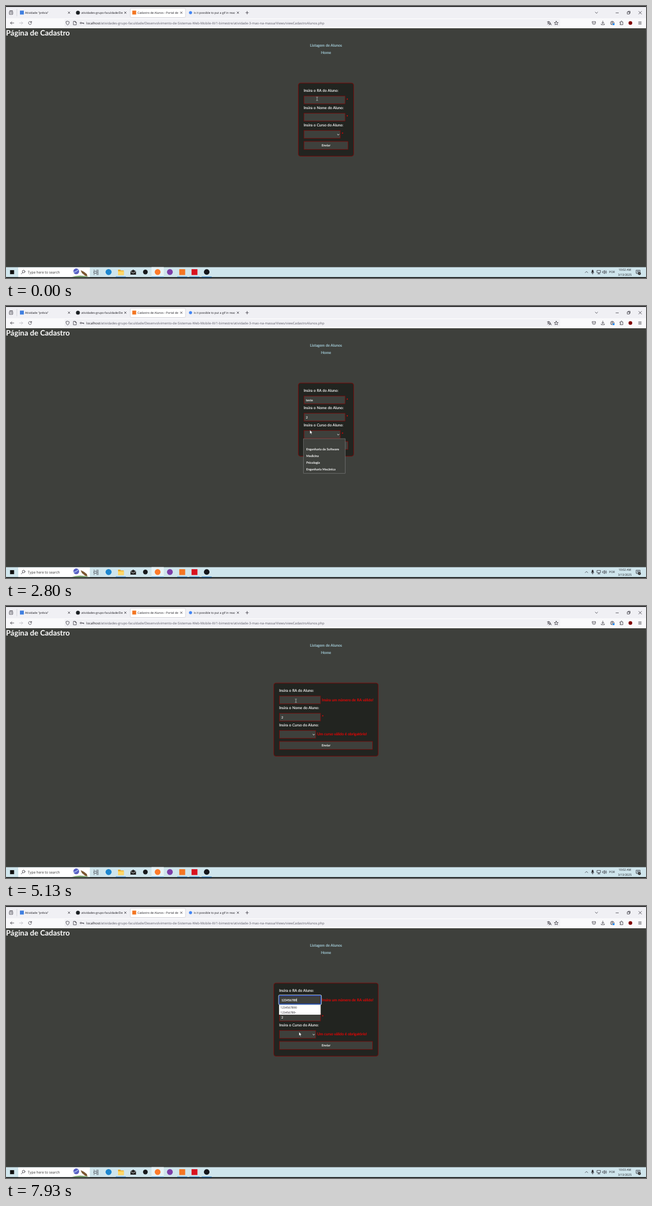
An HTML page that plays this animation: 1148x488 px, repeating every 8000 ms.

```html
<!DOCTYPE html>
<html lang="pt">
<head>
<meta charset="utf-8">
<title>Página de Cadastro</title>
<style>
  html, body { margin: 0; width: 100%; height: 100%; overflow: hidden; background: #000; }
  svg { display: block; width: 1148px; height: 488px; }
  text { text-rendering: geometricPrecision; white-space: pre; }
  .ui { font-family: "Open Sans", "Noto Sans", sans-serif; font-size: 5.16px; fill: #15141a; }
  .page { font-family: Lato, "Open Sans", sans-serif; font-size: 6.75px; fill: #fff;
          stroke: #fff; stroke-width: .12px; word-spacing: .1px; }
  .page .small { font-size: 5.65px; }
  .red { fill: #f00; stroke: #f00; }
  .link { fill: #add8e6; stroke: #add8e6; text-anchor: middle; }
  .line { fill: none; stroke: #2b2a33; stroke-width: .75; stroke-linecap: round; stroke-linejoin: round; }
  .field { fill: #3e403c; stroke: #8b0000; stroke-width: .7; }
  .mid { text-anchor: middle; }
</style>
</head>
<body>
<svg viewBox="0 0 1148 488">
  <rect width="1148" height="488"/>

  <!-- tab strip -->
  <rect y="1.5" width="1148" height="21" fill="#f0f0f4"/>
  <rect x="223" y="4" width="99" height="16.5" rx="2" fill="#fff" stroke="#c4c4cc" stroke-width=".6"/>
  <rect x="25" y="8.3" width="7" height="7" fill="#3f7fe0"/>
  <circle cx="129" cy="12" r="3.5" fill="#1b1f23"/>
  <rect x="226.5" y="8.3" width="7" height="7" fill="#f37623"/>
  <circle cx="331" cy="12" r="2.8" fill="#4285f4"/>
  <g class="ui">
    <text x="34" y="13.9">Atividade "prévia"</text>
    <text x="135" y="13.9">atividades-grupo-faculdade/De</text>
    <text x="236" y="13.9">Cadastro de Alunos - Portal de</text>
    <text x="337" y="13.9">is it possible to put a gif in reac</text>
  </g>
  <g class="line">
    <path d="M6.5 10h5.5v5h-5.5zM6.8 8.4h5M8 12.5h2.5"/>
    <path d="M19.5 6v12" stroke="#b8b8c2" stroke-width=".5"/>
    <path id="closers"/>
    <path d="M430 12h5M432.5 9.5v5"/>
    <path d="M1057 11l2.2 2.2 2.2-2.2M1094 12.3h4.6M1114.7 10.8h3.6v3.6h-3.6zM1115.9 10.6v-1.2h3.6v3.6h-1M1135 9.5l5 5m0-5l-5 5"/>
  </g>

  <!-- address bar -->
  <rect y="22" width="1148" height="18" fill="#f9f9fb"/>
  <path d="M0 39.7h1148" stroke="#c9c9d0" stroke-width=".5"/>
  <rect x="105" y="23.8" width="889" height="13.8" rx="2" fill="#f0f0f4"/>
  <text class="ui" x="144" y="32.9" style="font-size:5.94px;fill:#5b5b66"><tspan fill="#15141a">localhost</tspan>/atividades-grupo-faculdade/Desenvolvimento-de-Sistemas-Web-Mobile-III/1-bimestre/atividade-3-mao-na-massa/Views/viewCadastroAlunos.php</text>
  <g class="line">
    <path d="M14 30.5h-6m2.5-2.5l-2.5 2.5 2.5 2.5"/>
    <path d="M24 30.5h6m-2.5-2.5l2.5 2.5-2.5 2.5" stroke="#b5b5bd"/>
    <path d="M45.6 29.2a2.8 2.8 0 1 0 .2 2M45.8 27.4v2h-2"/>
    <path d="M110.5 27.3l2.8 1c0 3-.8 4.6-2.8 5.7-2-1.1-2.8-2.7-2.8-5.7z"/>
    <path d="M121.3 27.5h3l1.8 1.8v4.5h-4.8zM124.2 27.6v1.8h1.8"/>
    <path d="M133 30.5a1.3 1.3 0 1 0 2.6 0 1.3 1.3 0 1 0-2.6 0M135.6 30.5h4v1.4m-1.6-1.4v1.2"/>
    <path d="M971 28.4h4.2m-2.1-1v1m1.4 0c-.4 2-1.8 3.4-3.3 4m.6-3c.6 1.4 1.6 2.2 2.6 2.6M974.2 34l1.9-4.4 1.9 4.4m-3.2-1.3h2.5"/>
    <path d="M987 27.2l1 2.3 2.5.2-1.9 1.6.6 2.5-2.2-1.3-2.2 1.3.6-2.5-1.9-1.6 2.5-.2z"/>
    <path d="M1051.7 28h5.8v2.2a2.9 2.9 0 0 1-5.8 0zM1053.3 29.8l1.3 1.3 1.3-1.3"/>
    <path d="M1070.6 27v4.4m-1.8-1.8l1.8 1.8 1.8-1.8M1067.8 32v1.6h5.6V32"/>
    <circle cx="1087.5" cy="30.5" r="3.2"/><path d="M1086.5 29.5a1 1 0 1 0 2 0 1 1 0 1 0-2 0M1085.4 32.4q2.1-2 4.2 0"/>
    <path d="M1101.5 28.7h1.6q-.5-1.8.9-1.8t.9 1.8h1.6v4.9h-5v-1.5q1.6.4 1.6-.9t-1.6-.9z"/>
    <path d="M1134.7 28.4h4.8m-4.8 2.1h4.8m-4.8 2.1h4.8"/>
  </g>
  <circle cx="1090" cy="32.8" r="1.7" fill="#0a84ff"/>
  <circle cx="1120" cy="30.5" r="3.3" fill="#800000"/>

  <!-- page -->
  <rect y="40" width="1148" height="428.5" fill="#3e403c"/>
  <g class="page">
    <text x="0" y="53.1" style="font-size:13.4px;font-weight:700;stroke:none">Página de Cadastro</text>
    <text class="link" x="574" y="73.2">Listagem de Alunos</text>
    <text class="link" x="574" y="86.2">Home</text>
    <rect id="box" y="138.2" height="131.2" rx="4" fill="#222420" stroke="#8b0000" stroke-width=".8"/>
    <rect id="button" class="field" y="243" height="14.2"/>
    <text class="small mid" x="574" y="252.2">Enviar</text>
    <g id="fields">
      <text x="534" y="154.4">Insira o RA do Aluno:</text>
      <text x="534" y="185.4">Insira o Nome do Aluno:</text>
      <text x="534" y="216.4">Insira o Curso do Aluno:</text>
      <text id="raNote" class="red" x="610.8" y="170.8"></text>
      <text class="red" x="610.8" y="201.4">*</text>
      <text id="courseNote" class="red" x="602.3" y="232.4"></text>
      <rect class="field" x="534.4" y="161.4" width="73.8" height="14"/>
      <rect class="field" x="534.4" y="192.3" width="73.8" height="14"/>
      <rect class="field" x="534.4" y="223.2" width="65.4" height="14"/>
      <path d="M594.2 229.8l1.8 1.8 1.8-1.8" fill="none" stroke-width=".9"/>
      <g id="ring" fill="none">
        <rect x="533.1" y="159.9" width="76.6" height="17" rx="1.2" stroke="#fff" stroke-width="1"/>
        <rect x="534.1" y="160.9" width="74.6" height="15" rx=".6" stroke="#0050d8" stroke-width="1.1"/>
      </g>
      <text id="ra" class="small" x="538" y="170.7"></text>
      <text id="name" class="small" x="538" y="201.6"></text>
      <path id="caret" stroke-width=".6"/>
      <g id="popup" stroke="none">
        <rect id="popupBox" x="533.8" y="177.3" width="74.6" fill="#fff"/>
        <g id="popupRows" class="ui"></g>
      </g>
    </g>
    <g id="courses" class="small">
      <rect x="533.7" y="238" width="74.8" height="62.2" fill="#3e403c" stroke="#858585" stroke-width=".6"/>
      <text x="538.5" y="259.4">Engenharia de Software</text>
      <text x="538.5" y="271.1">Medicina</text>
      <text x="538.5" y="282.8">Psicologia</text>
      <text x="538.5" y="294.5">Engenharia Mecânica</text>
    </g>
  </g>

  <!-- taskbar -->
  <rect y="468.5" width="1148" height="18" fill="#cfe5ec"/>
  <rect x="7.3" y="473.9" width="7.2" height="7.2" fill="#111"/>
  <rect x="22" y="469" width="128.3" height="17.2" fill="#fff"/>
  <text class="ui" x="39" y="479.8" style="font-size:6.3px;fill:#333">Type here to search</text>
  <path d="M117 486.2q16-5 33 0z" fill="#6f9d62"/>
  <circle cx="126" cy="476" r="5.2" fill="#5b62c4"/>
  <path d="M121 478q5-1 9-5" stroke="#a9c4f2" stroke-width="1.5" fill="none"/>
  <path d="M134 474l6 3 5 4 1 4-4-1-6-5z" fill="#7a5630"/>
  <rect x="261" y="468.5" width="22" height="18" fill="#e6f2f6"/>
  <circle cx="184" cy="477.3" r="5.4" fill="#1c86cf"/>
  <path d="M201 473h4l1 1.4h5.3v8H201z" fill="#e9ad2f"/>
  <path d="M201 476h10.3v6.4H201z" fill="#ffd766"/>
  <path d="M223.2 476l5-3 5 3v6h-10z" fill="#222"/>
  <path d="M223.6 476.3l4.6 2.8 4.6-2.8" fill="none" stroke="#fff" stroke-width=".8"/>
  <circle cx="250" cy="477.3" r="4.2" fill="#17181a"/>
  <circle cx="272" cy="477.3" r="5.2" fill="#ff7b2b"/>
  <circle cx="294" cy="477.3" r="5.2" fill="#7d3fa8"/>
  <rect x="310.8" y="472.2" width="10.6" height="10.4" fill="#f37623"/>
  <rect x="332.8" y="472.2" width="10.6" height="10.4" fill="#d9121f"/>
  <circle cx="360" cy="477.3" r="5" fill="#15151a"/>
  <path d="M197 486h18M261 486h22M307 486h18M329 486h18M351 486h18" stroke="#1f78c8" stroke-width="1"/>
  <g class="line">
    <circle cx="31.6" cy="476.4" r="2.4"/><path d="M29.8 478.3l-2.4 2.5"/>
    <path d="M158 474.5v-1m5 1v-1M158 476h5v3.4h-5zM158 481v1.2m5-1.2v1.2M165 473.5v8.8"/>
    <path d="M1039 478.5l2.3-2.3 2.3 2.3"/>
    <rect x="1051" y="473.9" width="2.4" height="4.4" rx="1.2" fill="#222"/><path d="M1050 477.5q0 2.2 2.2 2.2t2.2-2.2M1052.2 479.8v1.4"/>
    <path d="M1060.4 474.4h6v4h-6zM1061.5 480.6h4M1063.4 478.5v2"/>
    <path d="M1070.5 476.2h1.3l1.8-1.7v5.8l-1.8-1.7h-1.3zM1075 475.9q1 1.5 0 3M1076.4 474.9q1.8 2.5 0 5"/>
    <path d="M1130.6 474h6.8v5.4h-3.6l-1.6 1.6v-1.6h-1.6zM1132.2 475.8h3.6m-3.6 1.6h3.6"/>
  </g>
  <circle cx="1136.2" cy="480" r="2.5" fill="#222"/>
  <text class="ui mid" x="1136.2" y="481.3" style="font-size:3.6px;fill:#fff">4</text>
  <g class="ui mid">
    <text x="1087" y="479.2">POR</text>
    <text id="clock" x="1110" y="475.3"></text>
    <text x="1110" y="483.6">3/13/2025</text>
  </g>

  <!-- pointers -->
  <path id="arrow" d="M0 0v7l1.6-1.5 1.1 2.6 1.2-.5-1.1-2.5h2.2z" fill="#fff" stroke="#111" stroke-width=".45"/>
  <path id="beam" d="M-1.6-3.1h1.2l.4.4.4-.4h1.2M0-2.7v5.4M-1.6 3.1h1.2l.4-.4.4.4h1.2" fill="none" stroke="#d8d8d8" stroke-width=".65"/>
</svg>
<script>
  const LOOP = 8000, TICK = 1000 / 15;
  const $ = id => document.getElementById(id);

  // [start ms, value]: each value holds until the next
  const raText = [[0, ''], [1470, 't'], [1530, 'tes'], [1600, 'teste'], [4400, ''],
    [5930, '1'], [6070, '12'], [6200, '123'], [6400, '1234'], [6670, '12345'],
    [6870, '123456'], [7070, '1234567'], [7330, '12345678'], [7530, '123456789']];
  const nameText = [[0, ''], [2200, '2']];
  const focus = [[0, 0], [200, 1], [1870, 2], [2730, 0], [5400, 1]];
  const coursesOpen = [[0, false], [2730, true], [3730, false]];
  const rejected = [[0, false], [4400, true]];
  const clock = [[0, '10:02 AM'], [7800, '10:03 AM']];
  const pointer = [[0, 'beam'], [330, 'arrow'], [1200, 'beam'], [2530, 'arrow'],
    [5000, 'beam'], [5930, ''], [7530, 'beam'], [7660, 'arrow']];

  // [ms, x, y] of the pointer
  const path = [[0, 558, 166.5], [200, 558, 166.5], [530, 742, 148], [870, 742, 148],
    [1330, 551, 198], [2400, 551, 198], [2670, 545, 222.5], [2930, 545, 222.5],
    [3200, 565, 289], [3530, 555, 246.5], [3800, 555, 246.5], [4070, 583, 249],
    [4670, 583, 249], [5130, 520, 170], [7530, 520, 170], [7860, 525.5, 226], [LOOP, 525.5, 226]];

  const history = ['teste', '1234567890', '123456789-', 'aaaabbb1234aaaabbbb',
    'skibidi1234', 'aluno123', 'aluno12'];

  const at = (table, t) => table.reduce((v, [start, next]) => t >= start ? next : v, table[0][1]);
  const show = (id, on) => { $(id).style.display = on ? '' : 'none'; };
  const put = (id, text) => { if ($(id).textContent !== text) $(id).textContent = text; };
  const span = (id, x, width) => { $(id).setAttribute('x', x); $(id).setAttribute('width', width); };
  const move = (id, x, y) => $(id).setAttribute('transform', `translate(${x} ${y})`);

  function pointerAt(t) {
    const i = Math.max(1, path.findIndex(p => p[0] >= t));
    const [t0, x0, y0] = path[i - 1], [t1, x1, y1] = path[i];
    const k = Math.min(1, (t - t0) / (t1 - t0)), e = k * k * (3 - 2 * k);
    return [x0 + (x1 - x0) * e, y0 + (y1 - y0) * e];
  }

  let listed;
  function drawPopup(text, open) {
    const rows = open && text ? history.filter(h => h.includes(text)) : [];
    show('popup', rows.length);
    if (listed === rows.join()) return;
    listed = rows.join();
    $('popupBox').setAttribute('height', rows.length * 9 - .3);
    $('popupRows').innerHTML = rows.map((r, i) =>
      `<text x="536.2" y="${183.5 + i * 9}">${r}</text>`).join('');
  }

  function draw(ms) {
    const t = Math.min(LOOP, Math.floor((ms + 4) / TICK) * TICK + 5);
    const wide = at(rejected, t), ra = at(raText, t), active = at(focus, t);

    span('box', wide ? 480.4 : 524.4, wide ? 187.2 : 99.2);
    span('button', wide ? 490.4 : 534.4, wide ? 167.2 : 79.2);
    move('fields', wide ? -44 : 0, 0);
    put('raNote', wide ? 'Insira um número de RA válido!' : '*');
    put('courseNote', wide ? 'Um curso válido é obrigatório!' : '*');

    put('ra', ra);
    $('ra').style.letterSpacing = wide ? '-.25px' : '';
    put('name', at(nameText, t));
    show('ring', active);
    move('ring', 0, active === 2 ? 30.9 : 0);
    show('caret', wide && active === 1);
    $('caret').setAttribute('d', `M${538.2 + ra.length * 3.03} 165.6v6.2`);
    drawPopup(ra, active === 1);
    show('courses', at(coursesOpen, t));
    put('clock', at(clock, t));

    const kind = at(pointer, t), [x, y] = pointerAt(t);
    for (const id of ['arrow', 'beam']) {
      show(id, id === kind);
      move(id, x, y);
    }
  }

  $('closers').setAttribute('d', [113, 214, 314.5, 416]
    .map(x => `M${x - 1.6} 10.4l3.2 3.2m0-3.2l-3.2 3.2`).join(''));

  const start = performance.now();
  function frame() {
    draw((performance.now() - start) % LOOP);
    requestAnimationFrame(frame);
  }
  frame();
</script>
</body>
</html>
```
